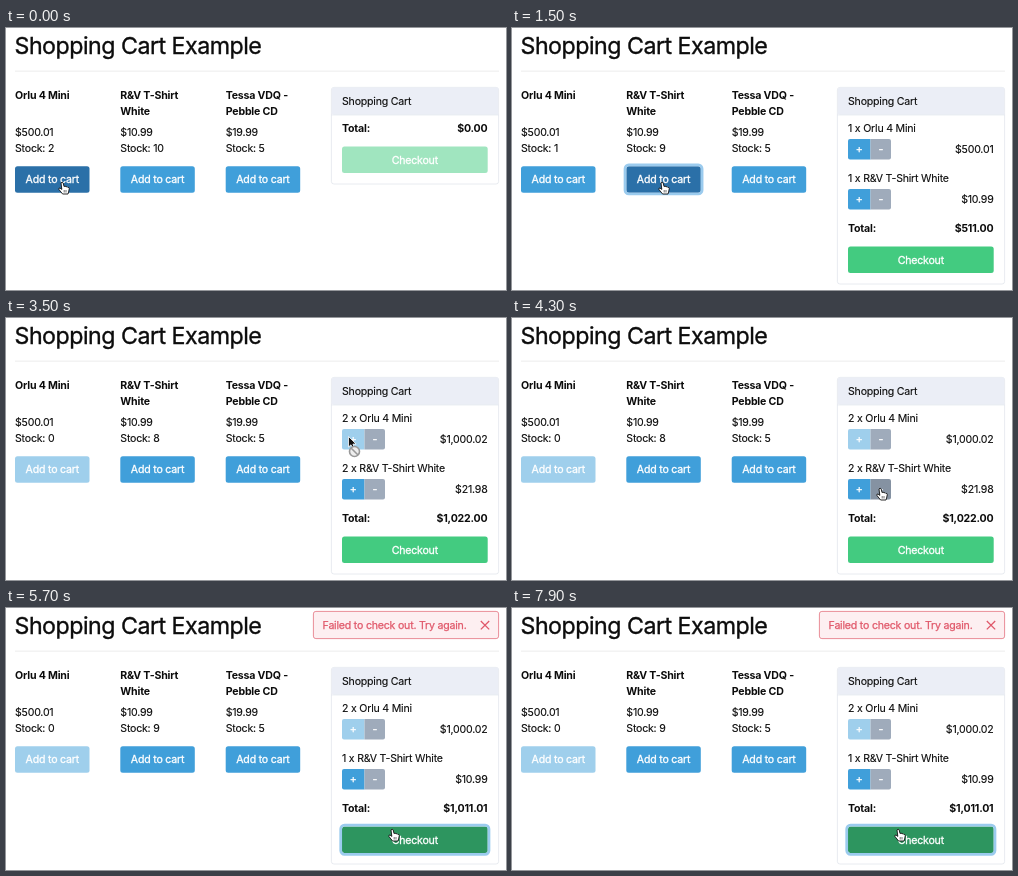
An HTML page for the animation above (8000 ms loop, 500 by 262 pixels).

```html
<!DOCTYPE html>
<html lang="en">
<head>
<meta charset="utf-8">
<title>Shopping Cart Example</title>
<style>
  html, body { margin: 0; width: 100%; height: 100%; overflow: hidden; background: #fff; }
  svg { display: block; }
  text {
    font: 10.6px Inter, Roboto, sans-serif; letter-spacing: -.02em; white-space: pre;
    color: #0c0c0c; fill: currentColor; stroke: currentColor; stroke-width: .12px;
  }
  .bold { font-weight: 700; letter-spacing: -.018em; stroke: none; }
  .title { font-size: 23.2px; letter-spacing: -.0215em; stroke-width: .35px; }
  .light { color: #fff; stroke-width: .3px; }
  .error { color: #e0586a; stroke-width: .25px; }
  .end { text-anchor: end; }
  .mid { text-anchor: middle; }
</style>
</head>
<body>
<svg id="stage" width="500" height="262" viewBox="0 0 500 262"></svg>
<script>
const LOOP = 8000;
const BLUE = ['#409fda', '#2b70a8'], GREEN = ['#43cb80', '#2d955f'], GRAY = ['#9fabbb', '#8592a2'];

const products = [
  { x: 9, lines: ['Orlu 4 Mini'], price: 500.01, stock: 2 },
  { x: 114.3, lines: ['R&amp;V T-Shirt', 'White'], price: 10.99, stock: 10 },
  { x: 219.7, lines: ['Tessa VDQ -', 'Pebble CD'], price: 19.99, stock: 5 }
];

// Clicks: time, focused control, product, change in quantity
const clicks = [
  [400, 'add0', 0, 1],
  [1400, 'add1', 1, 1],
  [1700, 'add1', 1, 1],
  [3100, 'plus0', 0, 1],
  [4600, 'minus1', 1, -1],
  [5500, 'checkout', 0, 0]
];
const ALERT_AT = 5600;

// Pointer tip: time, x, y
const path = [
  [0, 56, 154], [300, 56, 154], [800, 66, 153], [950, 66, 153], [1300, 150, 154], [1900, 150, 154],
  [2300, 269, 129], [2800, 342.5, 118.5], [3700, 342.5, 118.5], [4200, 368, 170], [4700, 368, 170],
  [5000, 386, 221], [LOOP, 386, 221]
];

const stage = document.getElementById('stage');
const money = v => '$' + v.toLocaleString('en-US', { minimumFractionDigits: 2, maximumFractionDigits: 2 });
const text = (x, y, s, cls = '') => `<text x="${x}" y="${y}" class="${cls}">${s}</text>`;
const rect = (x, y, w, h, r, attrs) => `<rect x="${x}" y="${y}" width="${w}" height="${h}" rx="${r}" ${attrs}/>`;

// Box with separate corner radii for its left and right sides
const box = (x, y, w, h, l, r) =>
  `M${x + l} ${y}h${w - l - r}a${r} ${r} 0 0 1 ${r} ${r}v${h - 2 * r}a${r} ${r} 0 0 1 ${-r} ${r}` +
  `h${l + r - w}a${l} ${l} 0 0 1 ${-l} ${-l}v${2 * l - h}a${l} ${l} 0 0 1 ${l} ${-l}z`;

function pointerAt(t) {
  const i = Math.max(1, path.findIndex(p => p[0] > t));
  const [t0, x0, y0] = path[i - 1], [t1, x1, y1] = path[i];
  const k = (t - t0) / (t1 - t0), e = k * k * (3 - 2 * k);
  return { x: x0 + (x1 - x0) * e, y: y0 + (y1 - y0) * e };
}

function cursor({ x, y }, kind) {
  const arrow = '<path d="M0 0V10.5L2.5 8.3 4.2 12 6 11.2 4.4 7.6H7.6Z" fill="#111" stroke="#fff" stroke-width=".8"/>';
  const hand = '<path d="M-1 1Q0-.8 1.2 1L2 4.5Q3.2 3.6 4 4.8 5.2 4.2 5.8 5.4 7.2 5 7.3 6.6L6.6 10 6 12H.6L-3 7.6Q-3.6 5.8-2 6L-.2 7.4Z" ' +
    'fill="#fff" stroke="#111" stroke-width=".9"/><path d="M2.2 8v2.5M4 8v2.5" stroke="#111" stroke-width=".6"/>';
  const banned = arrow + '<g fill="#eee" stroke="#999" stroke-width="1.6"><circle cx="6" cy="15" r="5"/><path d="M2.5 11.5l7 7"/></g>';
  return `<g transform="translate(${x} ${y})">${{ arrow, hand, banned }[kind]}</g>`;
}

function draw(t) {
  const done = clicks.filter(c => c[0] <= t);
  const focus = done.length ? done[done.length - 1][1] : '';
  const qty = products.map((_, i) => done.reduce((n, c) => n + (c[2] === i ? c[3] : 0), 0));
  const left = products.map((p, i) => p.stock - qty[i]);
  const pointer = pointerAt(t);
  let kind = 'arrow', rings = '';

  function button(id, label, x, y, w, h, colors, enabled = true, l = 2.5, r = 2.5) {
    const over = pointer.x >= x && pointer.x < x + w && pointer.y >= y && pointer.y < y + h;
    if (over) kind = enabled ? 'hand' : 'banned';
    if (focus === id && enabled)
      rings += `<path d="${box(x - 1.3, y - 1.3, w + 2.6, h + 2.6, l + 1.3, r + 1.3)}" fill="none" stroke="#9bcbee" stroke-width="2.7"/>`;
    return `<path d="${box(x, y, w, h, l, r)}" fill="${colors[+(over && enabled)]}" opacity="${enabled ? 1 : .5}"/>` +
      text(x + w / 2, y + h / 2 + 4, label, 'light mid');
  }

  let out = text(8.5, 26, 'Shopping Cart Example', 'title') + rect(9, 42.7, 484, .8, 0, 'fill="#e8e8e8"');

  products.forEach((p, i) => {
    p.lines.forEach((s, n) => out += text(p.x, 71 + 16 * n, s, 'bold'));
    out += text(p.x, 108, money(p.price)) + text(p.x, 123.7, 'Stock: ' + left[i]) +
      button('add' + i, 'Add to cart', p.x, 138.2, 74.5, 26.5, BLUE, left[i] > 0);
  });

  const items = products.map((_, i) => i).filter(i => qty[i] > 0);
  const shift = 50 * items.length;
  const total = items.reduce((sum, i) => sum + qty[i] * products[i].price, 0);
  out += rect(325.4, 59.4, 167.2, 96.6 + shift, 2.5, 'fill="#fff" stroke="#e3e6ed" stroke-width=".8"') +
    `<path d="${box(325.8, 59.8, 166.4, 27, 2, 0)}" fill="#ebeef6"/>` +
    rect(325.4, 86.6, 167.2, .7, 0, 'fill="#dfe3ec"') +
    text(336, 77, 'Shopping Cart');

  items.forEach((i, n) => {
    const y = 104 + 50 * n, p = products[i];
    out += text(336, y, `${qty[i]} x ${p.lines.join(' ')}`) +
      button('plus' + i, '+', 336, y + 7, 22.5, 20.5, BLUE, left[i] > 0, 2, 0) +
      button('minus' + i, '-', 358.5, y + 7, 20.5, 20.5, GRAY, true, 0, 2) +
      text(481.5, y + 21, money(qty[i] * p.price), 'end');
  });

  out += text(336, 104 + shift, 'Total:', 'bold') + text(481.5, 104 + shift, money(total), 'bold end') +
    button('checkout', 'Checkout', 336, 118.5 + shift, 145.7, 26.5, GREEN, items.length > 0);

  if (t >= ALERT_AT)
    out += rect(307.4, 3.4, 185.2, 27.2, 2.5, 'fill="#fdeff1" stroke="#e98d98" stroke-width="1"') +
      text(316.6, 21, 'Failed to check out. Try again.', 'error') +
      '<path d="M474.8 13l8.4 8.4m0-8.4l-8.4 8.4" stroke="#e0586a" stroke-width="1.3"/>';

  return out + rings + cursor(pointer, kind);
}

const start = performance.now();
let shown = '';
function tick() {
  const next = draw((performance.now() - start) % LOOP);
  if (next !== shown) stage.innerHTML = shown = next;
  requestAnimationFrame(tick);
}
tick();
</script>
</body>
</html>
```
